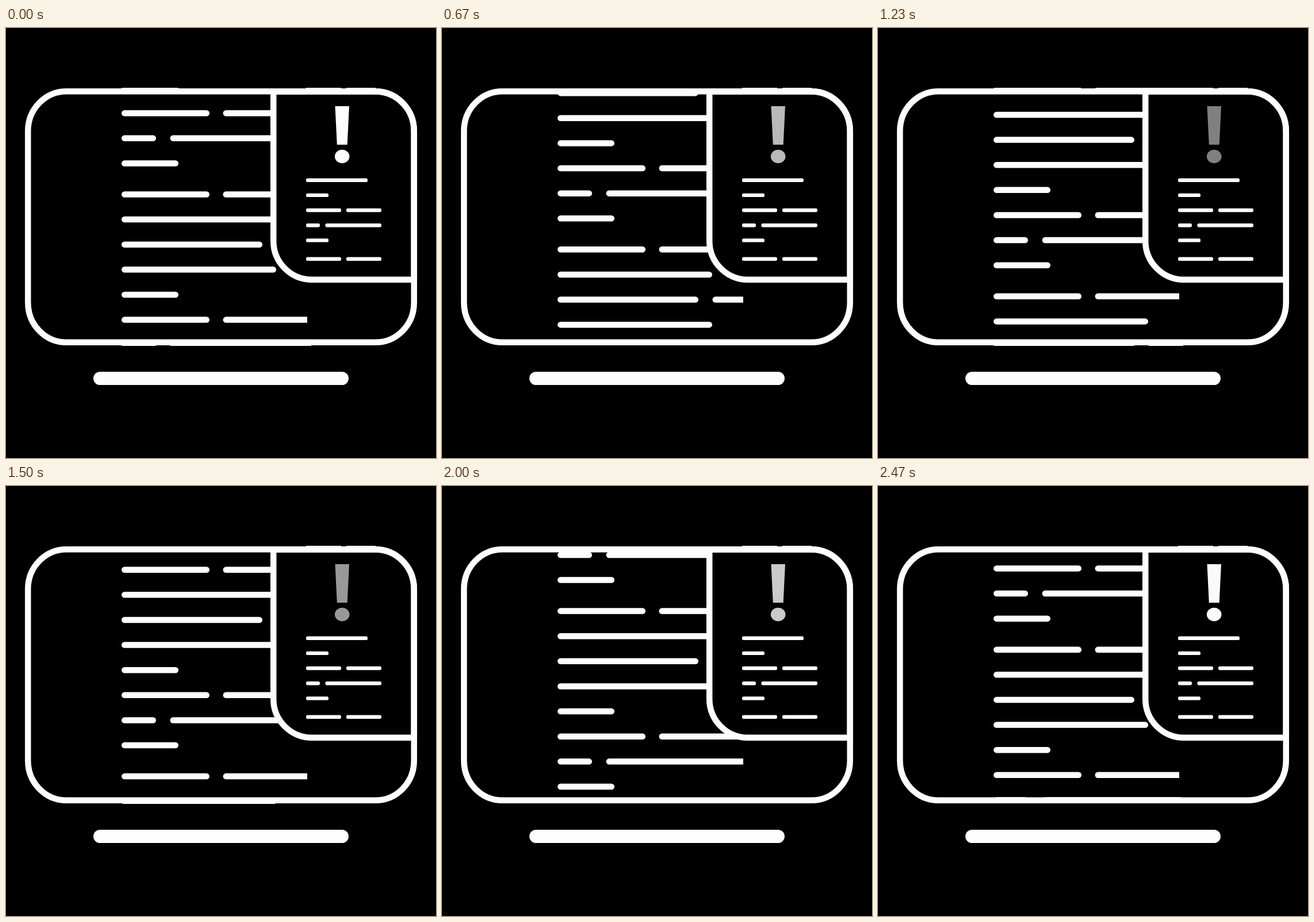
Write an HTML page that moves like this. It is 748 px wide and 748 px high and loops after 2500 ms.

```html
<!DOCTYPE html>
<html lang="en">
<head>
<meta charset="utf-8">
<title>Scrolling screen alert</title>
<style>
  html, body { margin: 0; width: 100%; height: 100%; overflow: hidden; background: #000; }
  svg { display: block; width: 100%; height: 100%; }
</style>
</head>
<body>
<svg viewBox="0 0 748 748" fill="#fdfdfd">
  <defs>
    <clipPath id="screen"><rect x="190" y="104" width="350" height="449"/></clipPath>
  </defs>
  <rect width="748" height="748" fill="#000"/>
  <g clip-path="url(#screen)"><g id="rows"></g></g>
  <rect x="524" y="115" width="60" height="426" fill="#000"/>
  <path d="M465.2 110.6H643A67 69 0 0 1 709.8 179V437.8H532.5A67.3 67.3 0 0 1 465.2 370.5Z"
        fill="#000" stroke="#fdfdfd" stroke-width="10.5"/>
  <rect x="38.2" y="110.2" width="671.6" height="436.6" rx="67" ry="69"
        fill="none" stroke="#fdfdfd" stroke-width="10.5"/>
  <path d="M522 104h61v2h-61zM592 104h51v2h-51z"/>
  <g id="note"></g>
  <g id="alert">
    <path d="M572.5 136H597L593.7 203H575.8Z"/>
    <ellipse cx="584.7" cy="223.5" rx="12.8" ry="11.8"/>
  </g>
  <rect x="152" y="598" width="444" height="23" rx="11.5"/>
</svg>
<script>
const LOOP = 2500, STEPS = 75;
const PERIOD = 359.4, TOP = 148.2;
const rows = document.getElementById('rows');
const note = document.getElementById('note');
const alertMark = document.getElementById('alert');

// Horizontal spans of each kind of line
const pair = [[201, 354], [377.5, 531]];
const split = [[201, 261], [285.5, 531]];
const short = [[201, 300]];
const long = [[201, 470]];
const broken = [[201, 446], [470.5, 531]];

function addLine(parent, spans, y, h, r) {
  for (const [a, b] of spans) {
    const bar = document.createElementNS('http://www.w3.org/2000/svg', 'rect');
    const attrs = { x: a, y: y - h / 2, width: b - a, height: h, rx: r };
    for (const k in attrs) bar.setAttribute(k, attrs[k]);
    parent.appendChild(bar);
  }
}

const block = [pair, split, short, pair, long, broken, long, short];
for (let n = -1; n < 2; n++) {
  block.forEach((spans, i) => {
    const y = TOP + n * PERIOD + i * 43.62 + (i > 2 ? 10.4 : 0);
    addLine(rows, spans, y, 10.5, 5.25);
  });
}

const halves = [[522, 583], [592, 653]];
const stub = [[522, 561]];
addLine(note, [[522, 629]], 264.8, 6.4, 2.6);
addLine(note, stub, 290.9, 6.4, 2.6);
addLine(note, halves, 317, 6.4, 2.6);
addLine(note, [[522, 546], [555.5, 653]], 343.2, 6.4, 2.6);
addLine(note, stub, 369.4, 6.4, 2.6);
addLine(note, halves, 401.7, 6.4, 2.6);

function draw(ms) {
  const step = Math.floor((ms % LOOP + 3.5) * STEPS / LOOP) % STEPS;
  const p = step / STEPS;
  rows.setAttribute('transform', `translate(0 ${(p * PERIOD).toFixed(2)})`);
  alertMark.setAttribute('opacity', 0.5 + Math.abs(p - 0.5));
}

const start = performance.now();
function tick() {
  draw(performance.now() - start);
  requestAnimationFrame(tick);
}
draw(0);
requestAnimationFrame(tick);
</script>
</body>
</html>
```
